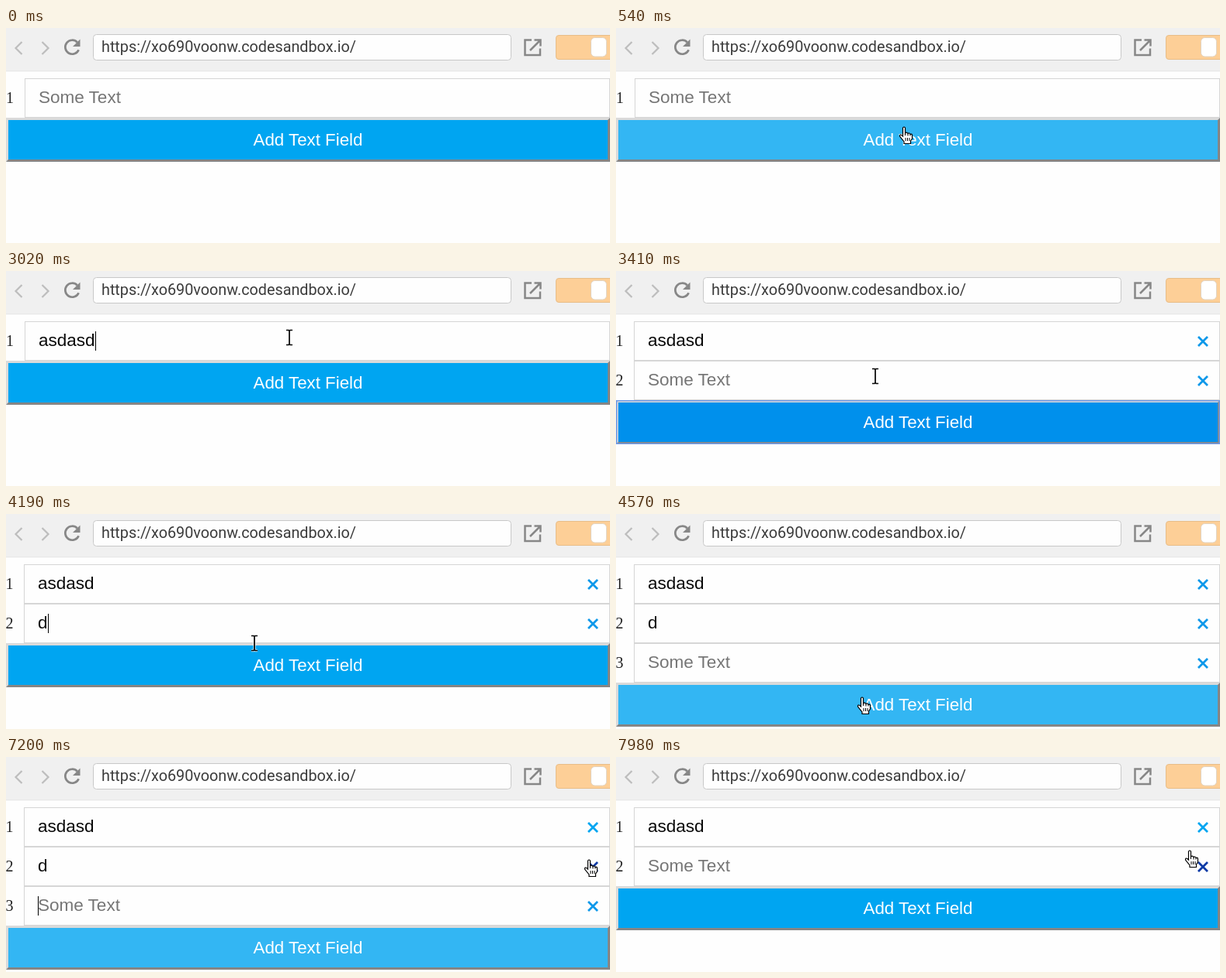
Write an HTML page that moves like this. It is 778 px wide and 278 px high and loops after 8000 ms.

```html
<!DOCTYPE html>
<html lang="en">
<head>
<meta charset="utf-8">
<title>Text field list</title>
<style>
  html, body { margin: 0; width: 100%; height: 100%; overflow: hidden; background: #fefefe; }
  svg { display: block; width: 778px; height: 278px; }
  text { white-space: pre; }
  .url { font: 19.8px Roboto, sans-serif; fill: #3c3c3c; }
  .num { font: 20px "Liberation Serif", serif; fill: #222; }
  .field { font: 22.5px "Liberation Sans", sans-serif; fill: #0a0a0a; }
  .hint { fill: #757575; }
  .label { font: 22.3px "Liberation Sans", sans-serif; fill: #fff; text-anchor: middle; }
</style>
</head>
<body>
<svg viewBox="0 0 778 278" xmlns="http://www.w3.org/2000/svg">
  <rect width="778" height="278" fill="#fefefe"/>
  <rect width="778" height="55" fill="#f0f0f0"/>
  <rect y="55" width="778" height="1" fill="#e8e8e8"/>
  <rect y="56" width="778" height="1" fill="#f8f8f8"/>
  <g fill="none" stroke-width="2.2">
    <path d="M20.5 18l-8 8 8 8M46.500 18l8 8-8 8" stroke="#bdbdbd"/>
    <path d="M91.800 18.500A9 9 0 1 0 93.600 28.200" stroke="#878787" stroke-width="2.700"/>
    <path d="M95.500 14.500v9.500h-9.500z" fill="#878787"/>
    <path d="M677 15.500h-8.500v19.500h19.500v-8.500M680.500 15.500h8v8M688 16l-13 13" stroke="#878787" stroke-width="2.500"/>
  </g>
  <rect x="112.500" y="8.500" width="538" height="33" rx="4" fill="#fefefe" stroke="#c8c8c8"/>
  <text class="url" x="123" y="31">https://xo690voonw.codesandbox.io/</text>
  <rect x="708.500" y="9.500" width="74" height="31" rx="3.500" fill="#fdcf97" stroke="#e8bd88"/>
  <rect x="753.500" y="12.500" width="20" height="24.500" rx="5" fill="#fff" stroke="#e2d3c0"/>
  <g id="app"></g>
</svg>
<script>
const LOOP = 8000, WIDTH = 778, TOP = 65, PITCH = 51;
const NORMAL = '#00a5f1', HOVER = '#33b6f3', ACTIVE = '#0090ec';
const CROSS = '#0d98ea', CROSS_HOT = '#0b3aa6';

const beam = (x, y) => ({ pointer: ['beam', x, y] });
const hand = (x, y) => ({ pointer: ['hand', x, y] });
const arrow = (x, y) => ({ pointer: ['arrow', x, y] });

// Each step overrides part of the state that came before it.
const steps = [
  [0, { rows: [''], caret: -1, button: NORMAL, focus: false, hot: -1, lit: -1, pointer: null }],
  [310, arrow(374, 256)],
  [390, { ...hand(373, 160), button: HOVER }],
  [540, hand(371, 128)],
  [620, { ...beam(367, 84), button: NORMAL }],
  [700, beam(364, 67)],
  [930, beam(363, 82)],
  [1000, { ...beam(363, 84), caret: 0 }],
  [1170, beam(365, 85)],
  [1550, { caret: -1 }],
  [2100, { caret: 0 }],
  [2560, { rows: ['a'] }],
  [2640, { rows: ['as'] }],
  [2720, { rows: ['asd'] }],
  [2870, { rows: ['asda'] }],
  [2950, { rows: ['asdas'] }],
  [3020, { rows: ['asdasd'], ...beam(365, 86) }],
  [3100, beam(350, 108)],
  [3180, { ...hand(336, 134), button: HOVER }],
  [3330, { rows: ['asdasd', ''], caret: -1, button: ACTIVE, focus: true, ...hand(334, 136) }],
  [3410, beam(334, 136)],
  [3710, { button: NORMAL, ...beam(330, 139) }],
  [3940, { focus: false, caret: 1 }],
  [4110, { rows: ['asdasd', 'd'], ...beam(328, 146) }],
  [4190, beam(320, 167)],
  [4260, { ...hand(320, 178), button: HOVER }],
  [4340, hand(319, 188)],
  [4420, hand(318, 193)],
  [4570, { rows: ['asdasd', 'd', ''], caret: -1, ...hand(317, 237) }],
  [4970, hand(317, 223)],
  [5050, { ...beam(316, 204), caret: 2 }],
  [5120, beam(316, 206)],
  [5190, hand(317, 238)],
  [5500, hand(315, 224)],
  [5580, { ...beam(312, 205), caret: -1 }],
  [5660, beam(311, 202)],
  [6040, { ...beam(400, 200), caret: 2 }],
  [6120, beam(570, 194)],
  [6200, beam(715, 191)],
  [6280, { ...hand(751, 183), hot: 2 }],
  [6510, { caret: -1 }],
  [6740, { ...hand(752, 172), caret: 2 }],
  [6820, { ...hand(752, 146), hot: 1 }],
  [6890, { ...hand(752, 112), hot: 0 }],
  [6970, hand(752, 90)],
  [7050, { ...hand(752, 98), lit: 0 }],
  [7120, { ...hand(752, 122), hot: 1 }],
  [7200, hand(751, 133)],
  [7370, { rows: ['asdasd', ''], caret: -1 }],
  [7440, { button: NORMAL }],
  [7670, hand(751, 131)],
  [7750, hand(751, 127)],
  [7830, hand(751, 124)],
  [7980, hand(739, 121)]
];

let merged = {};
const states = steps.map(([at, change]) => (merged = { ...merged, ...change, at }));

const pointers = {
  beam: `<path d="M-4-9.500h3l1 1 1-1h3M0-8.500v17M-4 9.500h3l1-1 1 1h3" fill="none" stroke="#fff" stroke-opacity=".7" stroke-width="3.500"/>
    <path d="M-4-9.500h3l1 1 1-1h3M0-8.500v17M-4 9.500h3l1-1 1 1h3" fill="none" stroke="#000" stroke-width="1.700"/>`,
  hand: `<path d="M-1.500 1Q0-1 1.500 1V8Q3.500 6 5 8.500Q7 7 8 9.500Q10.500 8.500 10.500 11V15L8.500 18V21.500H0V19L-5.500 12Q-5.500 9-3 10.500L-1.500 12Z" fill="#fff" stroke="#000" stroke-width="1.200"/>
    <path d="M2 14v4M4.500 14v4M7 14v4M1.500 8v3M5 8.500v3M8 9.500v2" stroke="#000" fill="none"/>`,
  arrow: `<path d="M0 0V17L4 13.500 6.500 19.500 9 18.500 6.500 12.500H12Z" fill="#fff" stroke="#000"/>`
};

const ruler = document.createElement('canvas').getContext('2d');
ruler.font = '22.5px "Liberation Sans", sans-serif';

function drawRow(state, value, i) {
  const single = state.rows.length === 1;
  const left = single ? 24 : 23, textX = left + 18, y = TOP + i * PITCH;
  const caretX = Math.round(textX + ruler.measureText(value).width);
  const color = i === state.hot ? CROSS_HOT : i === state.lit ? NORMAL : CROSS;
  return `<text class="num" x="${single ? 0 : -0.5}" y="${y + 32}">${i + 1}</text>
    <rect x="${left + .5}" y="${y + .5}" width="${777 - left}" height="50" fill="#fefefe" stroke="#d6d6d6"/>
    <text class="field ${value ? '' : 'hint'}" x="${textX}" y="${y + 32}">${value || 'Some Text'}</text>` +
    (state.caret === i ? `<rect x="${caretX}" y="${y + 13}" width="1" height="25" fill="#000"/>` : '') +
    (single ? '' : `<path d="M750 ${y + 20}l12 12m0-12l-12 12" stroke="${color}" stroke-width="2.800"/>`);
}

function drawButton({ rows, button, focus }) {
  const y = TOP + rows.length * PITCH, h = 57;
  return `<rect y="${y}" width="${WIDTH}" height="${h}" fill="#dadada"/>
    <path d="M${WIDTH} ${y}v${h}H0l3-3H775V${y + 3}z" fill="#858585"/>
    <rect x="3" y="${y + 3}" width="772" height="51" fill="${button}"/>` +
    (focus ? `<rect x=".75" y="${y + .75}" width="${WIDTH - 1.5}" height="${h - 1.5}" fill="none" stroke="#6f9ae6" stroke-width="1.500"/>` : '') +
    `<text class="label" x="389" y="${y + 36}">Add Text Field</text>`;
}

function drawPointer({ pointer }) {
  if (!pointer) return '';
  const [kind, x, y] = pointer;
  return `<g transform="translate(${x} ${y})">${pointers[kind]}</g>`;
}

const app = document.getElementById('app');
let shown = null;

function render(now) {
  const time = now % LOOP;
  const state = states.findLast(s => s.at <= time);
  if (state !== shown) {
    app.innerHTML = state.rows.map((value, i) => drawRow(state, value, i)).join('') +
      drawButton(state) + drawPointer(state);
    shown = state;
  }
}

const start = performance.now();
function tick() {
  render(performance.now() - start);
  requestAnimationFrame(tick);
}
tick();
</script>
</body>
</html>
```
